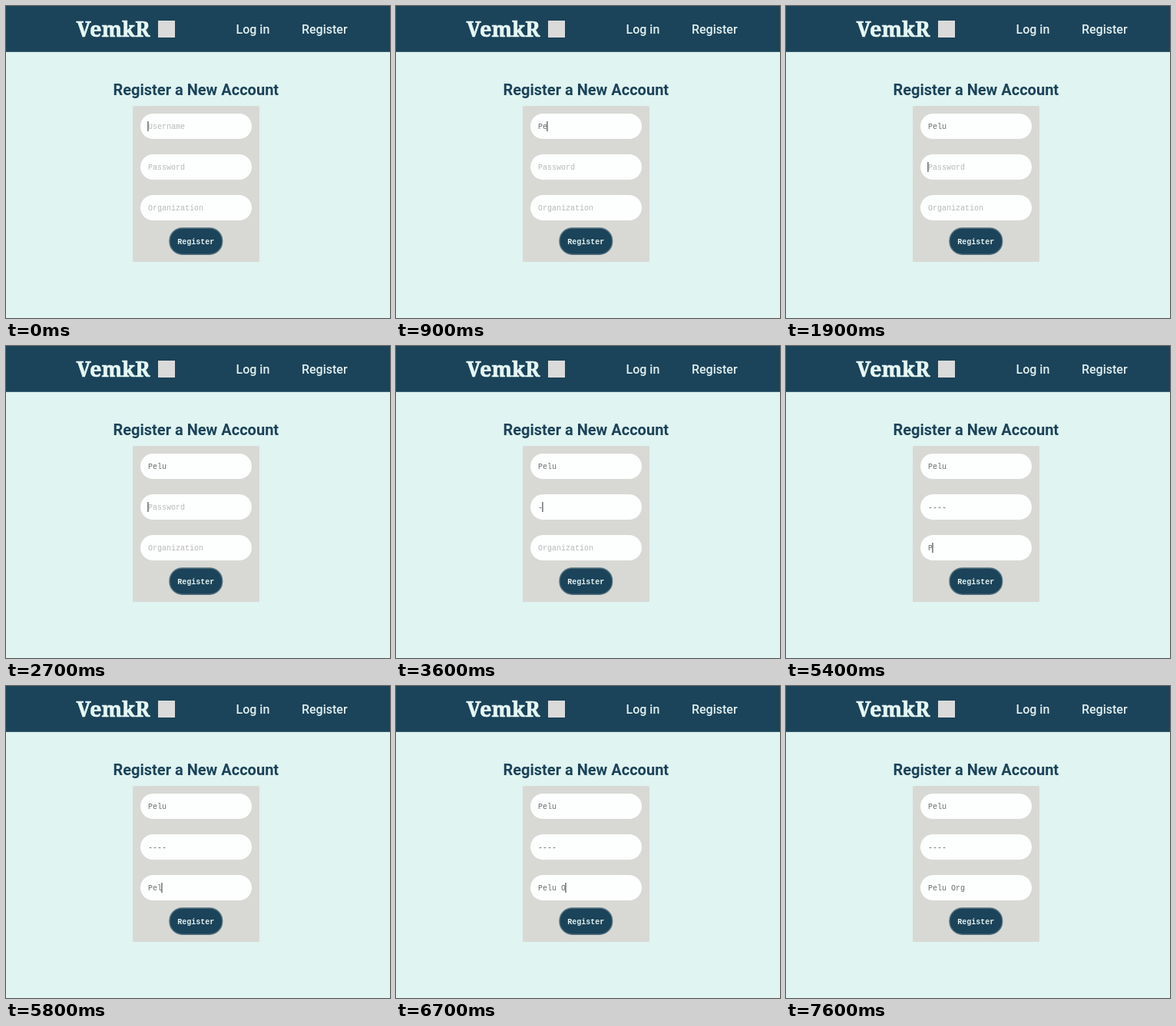
An HTML page that plays this animation: 500 by 406 pixels, repeating every 8 s.

```html
<!DOCTYPE html>
<html lang="en">
<head>
<meta charset="utf-8">
<title>Register a New Account</title>
<style>
  html, body { margin: 0; width: 100%; height: 100%; overflow: hidden; background: #e0f4f1; }
  svg { display: block; width: 100vw; height: 100vh; }
  .stage { filter: blur(.45px); }
  text { font-family: Roboto, "Open Sans", sans-serif; white-space: pre; }
  .bar, .button { fill: #1b4359; }
  .button { stroke: #54717f; stroke-width: 1.4; }
  .brand { font: 900 27px "Noto Serif", serif; fill: #e6f8f5; stroke: #e6f8f5; stroke-width: .7; text-anchor: middle; }
  .nav { font-size: 16px; font-weight: 500; fill: #e0efef; }
  .title { font-size: 20px; font-weight: 700; fill: #1b4359; text-anchor: middle; }
  .value, .label { font: 10px "Liberation Mono", monospace; }
  .value { fill: #6c6c6c; }
  .value.hint { fill: #b8b8b8; }
  .label { font-weight: 700; fill: #e3f1f0; text-anchor: middle; }
  .input { fill: #fdfefe; }
  #caret { fill: #666; }
</style>
</head>
<body>
<svg viewBox="0 0 500 406" preserveAspectRatio="none">
  <rect width="500" height="406" fill="#e0f4f1"/>
  <g class="stage">
    <rect class="bar" x="-10" y="-10" width="520" height="69.8"/>
    <text class="brand" x="139.5" y="40">VemkR</text>
    <rect x="198" y="19" width="22" height="22" fill="#dadada"/>
    <text class="nav" x="299.5" y="36">Log in</text>
    <text class="nav" x="385" y="36">Register</text>
    <text class="title" x="247.3" y="116">Register a New Account</text>

    <rect x="165" y="130" width="165" height="203" rx="1.5" fill="#d8d9d5"/>
    <g id="form"></g>
    <rect id="caret" width="1.4" height="13"/>

    <rect class="button" x="213" y="289" width="68.6" height="34.2" rx="16.5"/>
    <text class="label" x="247.2" y="309.5">Register</text>
  </g>
</svg>
<script>
  const LOOP = 8000, BLINK = 530, PITCH = 6, ROW = 53;

  // focus: caret arrives; from, to: first and last key press (ms)
  const fields = [
    { hint: "Username", value: "Pelu", focus: 0, from: 700, to: 1200 },
    { hint: "Password", value: "----", focus: 1600, from: 3600, to: 4000 },
    { hint: "Organization", value: "Pelu Org", focus: 4700, from: 5400, to: 7070 }
  ];

  const form = document.getElementById("form");
  const caret = document.getElementById("caret");

  function add(name, attrs) {
    const el = document.createElementNS("http://www.w3.org/2000/svg", name);
    for (const key in attrs) el.setAttribute(key, attrs[key]);
    return form.appendChild(el);
  }

  fields.forEach((field, i) => {
    add("rect", { class: "input", x: 175, y: 140 + ROW * i, width: 145, height: 33, rx: 16.5 });
    field.text = add("text", { x: 185, y: 160 + ROW * i });
  });

  // Typing slows down slightly towards the end of each value
  function keyTime({ value, from, to }, n) {
    return from + (to - from) * (n / (value.length - 1)) ** 1.2;
  }

  function typedCount(field, time) {
    let n = 0;
    while (n < field.value.length && keyTime(field, n) <= time) n++;
    return n;
  }

  function render(time) {
    fields.forEach((field, i) => {
      const n = typedCount(field, time);
      field.text.textContent = n ? field.value.slice(0, n) : field.hint;
      field.text.setAttribute("class", n ? "value" : "value hint");
      if (time < field.focus) return;

      const last = n ? keyTime(field, n - 1) : field.focus;
      const on = Math.floor((time - last) / BLINK) % 2 === 0;
      caret.setAttribute("x", 184.2 + PITCH * n);
      caret.setAttribute("y", 150 + ROW * i);
      caret.setAttribute("visibility", on ? "visible" : "hidden");
    });
  }

  function tick() {
    render(performance.now() % LOOP);
    requestAnimationFrame(tick);
  }
  tick();
</script>
</body>
</html>
```
